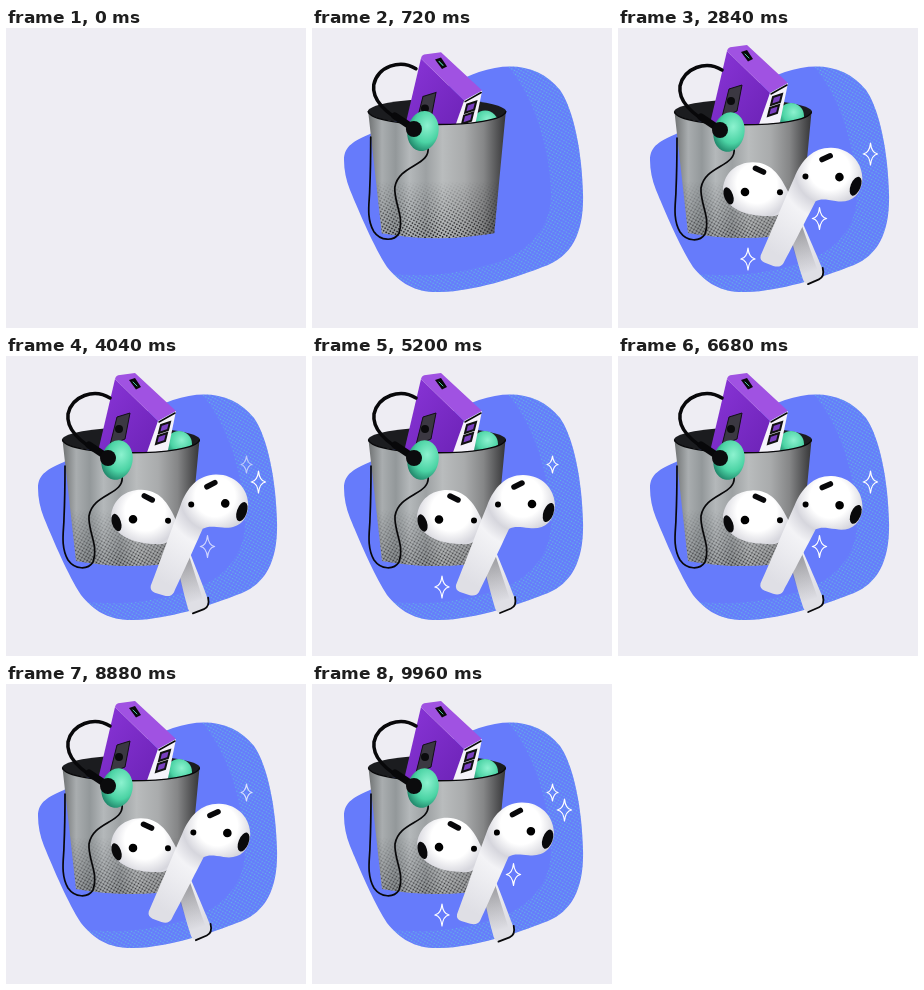
These frames come from a looping animation (300 by 300 pixels, 10 s). An HTML page:

```html
<!DOCTYPE html>
<html lang="en">
<head>
<meta charset="utf-8">
<title>Earbuds and bin</title>
<style>
  html, body { margin: 0; height: 100%; overflow: hidden; background: #eeedf3; }
  svg { display: block; width: 100%; height: 100%; }
  .line { fill: none; stroke: #08080a; stroke-linecap: round; stroke-linejoin: round; }
</style>
</head>
<body>
<svg viewBox="0 0 300 300">
  <defs>
    <linearGradient id="metal">
      <stop offset="0" stop-color="#6f7273"/>
      <stop offset=".1" stop-color="#a9adaf"/>
      <stop offset=".2" stop-color="#93989a"/>
      <stop offset=".3" stop-color="#b4b8ba"/>
      <stop offset=".42" stop-color="#9da1a3"/>
      <stop offset=".54" stop-color="#b9bcbd"/>
      <stop offset=".7" stop-color="#a9abac"/>
      <stop offset=".84" stop-color="#858687"/>
      <stop offset="1" stop-color="#353537"/>
    </linearGradient>
    <linearGradient id="purple" x1="0" y1="0" x2="1" y2="1">
      <stop offset="0" stop-color="#8a35d8"/>
      <stop offset="1" stop-color="#6b22b5"/>
    </linearGradient>
    <radialGradient id="mint" cx=".6" cy=".35" r=".7">
      <stop offset="0" stop-color="#8cf2cf"/>
      <stop offset=".6" stop-color="#4bd3a4"/>
      <stop offset="1" stop-color="#1c7f65"/>
    </radialGradient>
    <radialGradient id="shellR" gradientUnits="userSpaceOnUse" cx="210" cy="141" r="100">
      <stop offset=".2" stop-color="#fff"/>
      <stop offset=".35" stop-color="#d6d6dd"/>
      <stop offset=".5" stop-color="#f3f3f6"/>
      <stop offset="1" stop-color="#dfdfe5"/>
    </radialGradient>
    <radialGradient id="shellL" href="#shellR" cx="139" cy="155"/>
    <linearGradient id="shade" gradientUnits="userSpaceOnUse" x1="170" y1="185" x2="188" y2="246">
      <stop offset="0" stop-color="#66666a" stop-opacity="0"/>
      <stop offset=".3" stop-color="#66666a" stop-opacity=".6"/>
      <stop offset="1" stop-color="#66666a" stop-opacity="0"/>
    </linearGradient>
    <linearGradient id="fade" x1="0" y1="0" x2="0" y2="1">
      <stop offset=".55" stop-color="#000"/>
      <stop offset="1" stop-color="#fff"/>
    </linearGradient>
    <mask id="low"><rect x="50" y="84" width="150" height="126" fill="url(#fade)"/></mask>
    <pattern id="dots" width="3" height="3" patternUnits="userSpaceOnUse" patternTransform="rotate(30)">
      <circle cx="1.5" cy="1.5" r="1" fill="#222225"/>
    </pattern>
    <pattern id="blueDots" width="3" height="3" patternUnits="userSpaceOnUse" patternTransform="rotate(30)">
      <circle cx="1.5" cy="1.5" r=".8" fill="#62b4e6"/>
    </pattern>
    <path id="blobShape" d="M32 132C32 118 42 113 58 106C96 84 132 56 167 44C199 33 229 38 248 62C262 82 270 125 271 165C272 198 264 225 236 237C200 251 162 263 129 264C104 265 89 256 75 239C62 219 48 186 38 162C34 152 32 142 32 132Z"/>
    <clipPath id="inBlob"><use href="#blobShape"/></clipPath>
    <path id="can" d="M56.500 84C62 101 188 101 193.500 84L182 205Q124 215 70 205Z"/>
  </defs>

  <g id="blob">
    <use href="#blobShape" fill="#667bfb"/>
    <path d="M188 30C222 62 238 122 239 165C240 207 206 230 176 237C144 246 116 249 80 246L90 280H290V30Z" fill="url(#blueDots)" clip-path="url(#inBlob)"/>
  </g>

  <g id="bin">
    <ellipse cx="125" cy="84" rx="69" ry="12.500" fill="#1b1c1f"/>
    <g id="gadgets">
      <ellipse cx="173" cy="88" rx="13" ry="13" fill="url(#mint)"/>
      <path d="M109 23L152 65L140 105L91 100Z" fill="url(#purple)"/>
      <path d="M109 23Q110 19 114 19L129 17L170 55L152 65Z" fill="#a052e2"/>
      <path d="M152 65L170 55L160 104L138 105Z" fill="#f5f3fa"/>
      <path class="line" stroke-width="1.500" d="M153 66L169 57"/>
      <path d="M123 24l6-2 6 9-5 2.500z" fill="#09090b"/>
      <path class="line" d="M127 26l4 4" style="stroke:#48c79f"/>
      <path d="M111 61L124 57L119 83L104 89Z" fill="#3b3842" stroke="#121016"/>
      <circle cx="113" cy="73" r="4" fill="#0b0b0d"/>
      <path d="M155 69l9-3-2 8-9 3zM152 80l9-3-2 8-9 3z" fill="#7a3fc0" stroke="#111" stroke-width="2"/>
    </g>
    <use href="#can" fill="url(#metal)"/>
    <use href="#can" fill="url(#dots)" mask="url(#low)"/>
    <path class="line" stroke-width="1.300" d="M56.500 84C62 101 188 101 193.500 84"/>
    <g id="phones">
      <path class="line" stroke-width="3.500" d="M98 99C74 87 60 74 62 58C66 40 88 32 104 42"/>
      <path class="line" stroke-width="1.700" d="M116 120C119 139 87 137 83 160C82 176 93 190 87 206C82 214 69 214 62 204C54 190 58 174 58 162Q59 140 59 110"/>
      <ellipse cx="111" cy="104" rx="15.500" ry="20" fill="url(#mint)" transform="rotate(12 111 104)"/>
      <path class="line" stroke-width="7" d="M83 89L101 101"/>
      <circle cx="102" cy="102" r="8" fill="#0b0b0d"/>
    </g>
  </g>

  <g id="left">
    <path d="M105 160C107 143 120 134 135 134C153 134 162 147 169 162C178 180 195 222 203 243Q204 249 199 252L190 256Q185 258 183 252C176 228 170 200 164 184C160 187 157 189 150 188C132 188 106 182 105 160Z" fill="url(#shellL)"/>
    <path d="M172 190L190 245" fill="none" stroke="url(#shade)" stroke-width="16"/>
    <path class="line" stroke-width="1.800" d="M203 241Q205 250 199 252.500L188 257"/>
    <ellipse cx="110.500" cy="167" rx="4.500" ry="9" fill="#09090b" transform="rotate(-18 110.500 167)"/>
    <path class="line" stroke-width="5.500" d="M138 140L146 144"/>
    <circle cx="127" cy="163.500" r="4.300"/>
    <circle cx="162" cy="164.500" r="3"/>
  </g>

  <g id="right">
    <path d="M144 229C155 202 166 172 175 150C182 131 194 119 211 119C230 119 243 133 243 150C242 167 231 174 217 172C208 171 202 170 197 173C190 188 176 218 167 236Q164 241 157 239L148 236Q143 234 144 229Z" fill="url(#shellR)"/>
    <ellipse cx="236.500" cy="156.500" rx="5" ry="10" fill="#09090b" transform="rotate(20 236.500 156.500)"/>
    <path class="line" stroke-width="5.500" d="M202 131L210 127"/>
    <circle cx="186" cy="148.500" r="3"/>
    <circle cx="220" cy="148" r="4.300"/>
  </g>
  <g id="stars" fill="none" stroke="#fff" stroke-width="1.200" stroke-linejoin="round"></g>
</svg>
<script>
const $ = id => document.getElementById(id);
const clamp = x => Math.max(0, Math.min(1, x));
const span = (t, from, to) => clamp((t - from) / (to - from));
const easeOut = x => 1 - (1 - x) ** 3;
const backOut = x => 1 + 2.7 * (x - 1) ** 3 + 1.7 * (x - 1) ** 2;
const move = (id, transform, opacity = 1) => {
  $(id).setAttribute('transform', transform);
  $(id).setAttribute('opacity', opacity);
};
const scaleAt = (x, y, s) => `translate(${x} ${y}) scale(${s}) translate(${-x} ${-y})`;

// x, y, half height, twinkle period, brightest moment
const stars = [
  [252.5, 126, 11, 3600, 3430],
  [201.5, 190.5, 11, 3600, 3200],
  [130, 231, 11, 2400, 440],
  [240.5, 108.5, 8.5, 4760, 440]
].map(([x, y, h, period, peak]) => {
  const el = document.createElementNS('http://www.w3.org/2000/svg', 'path');
  const w = h * .65;
  el.setAttribute('d', `M0 ${-h}Q1 -1 ${w} 0Q1 1 0 ${h}Q-1 1 ${-w} 0Q-1 -1 0 ${-h}Z`);
  el.setAttribute('transform', `translate(${x} ${y})`);
  $('stars').append(el);
  return { el, period, peak };
});

function draw(t) {
  const blob = span(t, 0, 640);
  move('blob', scaleAt(151, 151, backOut(blob)), t > 20 ? 1 : 0);

  const bin = span(t, 240, 760);
  move('bin', scaleAt(125, 160, .5 + .5 * backOut(bin)), clamp(bin * 3));
  const drop = span(t, 440, 1000);
  move('gadgets', `translate(0 ${-90 * (1 - backOut(drop))})`, clamp(drop * 4));
  const phones = span(t, 520, 1080);
  move('phones', `translate(0 ${-60 * (1 - backOut(phones))})`, clamp(phones * 4));

  const settled = span(t, 1800, 2300);
  const sway = settled * Math.cos((t - 2700) * Math.PI / 1000);
  const left = easeOut(span(t, 1040, 1600));
  const lift = 32 * (1 - left) - 8 * left * (1 - easeOut(settled));
  move('left', `translate(0 ${lift}) rotate(${-1.4 * sway} 150 165)`, left);

  const right = easeOut(span(t, 1480, 2120));
  const away = 1 - right;
  move('right', `translate(${-19 * away} ${47 * away}) rotate(${2.2 * sway - 12 * away} 188 190)`, right ** 1.8);

  for (const { el, period, peak } of stars) {
    const glow = clamp(.5 + 1.8 * Math.cos((t - peak) / period * 2 * Math.PI));
    el.setAttribute('opacity', glow * span(t, 2100, 2500));
  }
}

const start = performance.now();
function frame() {
  draw((performance.now() - start) % 10000);
  requestAnimationFrame(frame);
}
draw(0);
requestAnimationFrame(frame);
</script>
</body>
</html>
```
